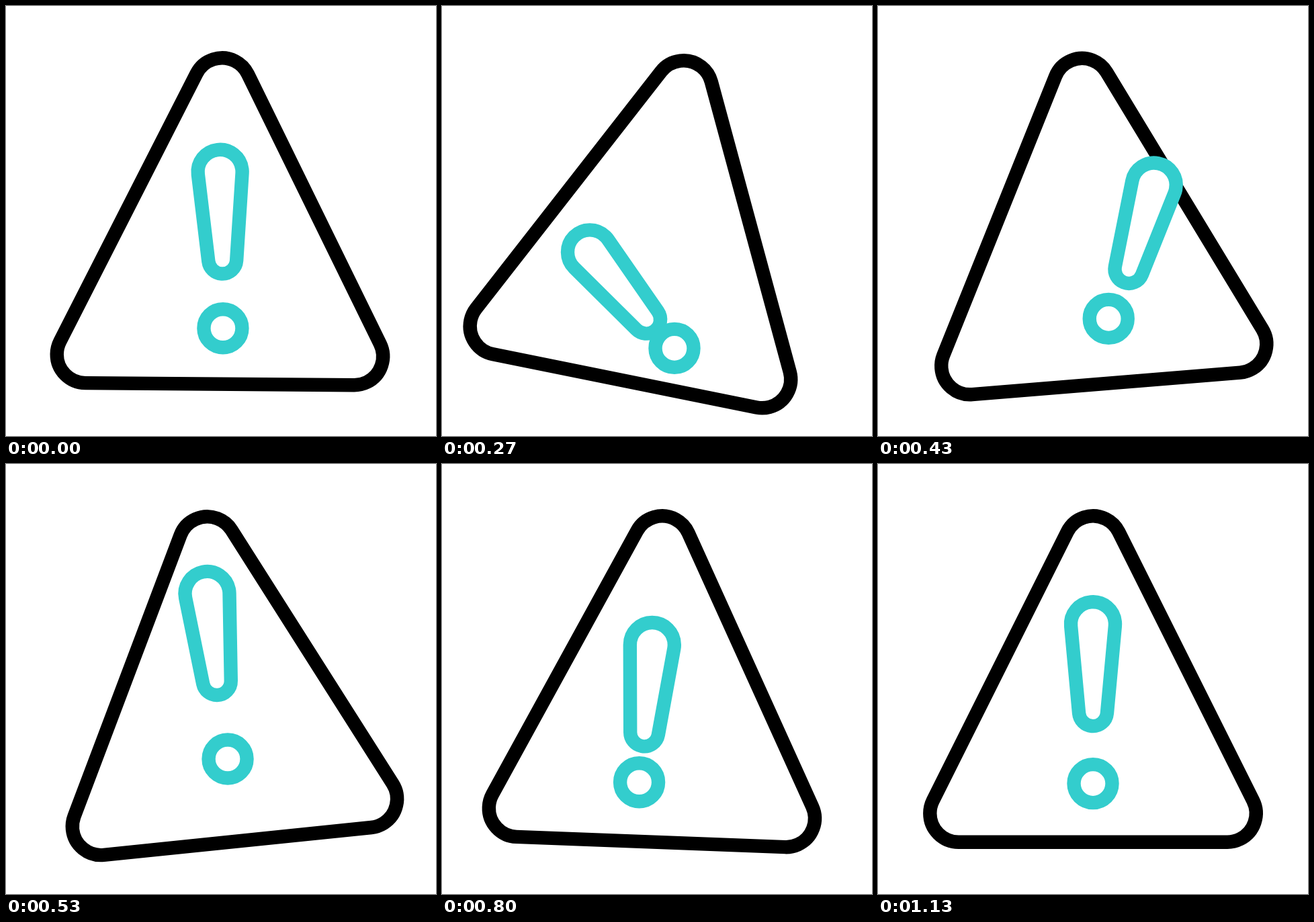
Recreate the animation shown at these times as an HTML page with a canvas. Size 640 px wide and 640 px high, loop 1.67 s.

```html
<!DOCTYPE html>
<html>
<head>
<meta charset="utf-8">
<style>
html, body { margin: 0; width: 100%; height: 100%; overflow: hidden; background: #fff; }
canvas { display: block; }
</style>
</head>
<body>
<canvas id="stage" width="640" height="640"></canvas>
<script>
const ctx = document.getElementById('stage').getContext('2d');
const LOOP = 1670, STEP = 100 / 3, REST = 35, LEG = REST / 4;
const PI = Math.PI, TEAL = '#33cdcd', DOT_Y = 475.6;

// Turns: [first step, last step, degrees]
const triangleTurns = [[.3, 6.3, 12], [8.25, 15.15, -18], [16.2, 27, 9], [27, 32.5, -3]];
const barTurns = [[.3, 6.3, -41.5], [8.64, 12.57, 63.5], [12.6, 17.75, -30], [17.75, 25, 13.1], [26, REST, -5.1]];

// Corners of each path: [x, y, sideways bow of the next leg]
const dotPath = [[0, 0, 0, 0], [25.5, 36, 9.2, 0], [7, -41, 0, 0], [-32, 4.6, 0, 0]];
const barPath = [[0, 0, -2.7, 0], [54, 73.5, 0, 26], [2.5, -60, 0, 0], [-33.4, 44.8, 0, 0]];

const ease = u => u * u * (3 - 2 * u);
const clamp = u => Math.max(0, Math.min(1, u));

const angle = (turns, n) =>
  turns.reduce((sum, [from, to, by]) => sum + by * ease(clamp((n - from) / (to - from))), 0);

// Constant speed along four equal legs, back to the first corner
function position(path, n) {
  const leg = Math.floor(n / LEG), u = n / LEG - leg;
  const a = path[leg % 4], b = path[(leg + 1) % 4];
  return [0, 1].map(i => a[i] + (b[i] - a[i]) * u + a[i + 2] * 4 * u * (1 - u));
}

// Each arc is [x, y, radius, from, to]; tangent lines join them
function outline(color, arcs, x, y, degrees) {
  ctx.save();
  ctx.translate(x, y);
  ctx.rotate(degrees * PI / 180);
  ctx.beginPath();
  arcs.forEach(arc => ctx.arc(...arc));
  ctx.closePath();
  ctx.fillStyle = '#fff';
  ctx.fill();
  ctx.lineWidth = 20.4;
  ctx.strokeStyle = color;
  ctx.stroke();
  ctx.restore();
}

const side = Math.atan2(1, 2), taper = Math.asin(12 / 130.8);
const triangle = [
  [0, -200, 42.7, PI + side, 2 * PI - side],
  [200, 200, 42.7, -side, PI / 2],
  [-200, 200, 42.7, PI / 2, PI + side]
];
const bar = [
  [0, 238.3 - DOT_Y, 33, PI - taper, 2 * PI + taper],
  [0, 369.1 - DOT_Y, 21, taper, PI - taper]
];
const dot = [[0, 0, 28.5, 0, 2 * PI]];

function draw(now) {
  const n = Math.min(REST, Math.floor((now % LOOP + 5) / STEP) + 1);
  const [dx, dy] = position(dotPath, n), [bx, by] = position(barPath, n);
  ctx.clearRect(0, 0, 640, 640);
  outline('#000', triangle, 320, 320, angle(triangleTurns, n));
  outline(TEAL, bar, 320 + bx, DOT_Y + by, angle(barTurns, n));
  outline(TEAL, dot, 320 + dx, DOT_Y + dy, 0);
}

let start;
function tick(now) {
  start ??= now;
  draw(now - start);
  requestAnimationFrame(tick);
}
draw(0);
requestAnimationFrame(tick);
</script>
</body>
</html>
```
